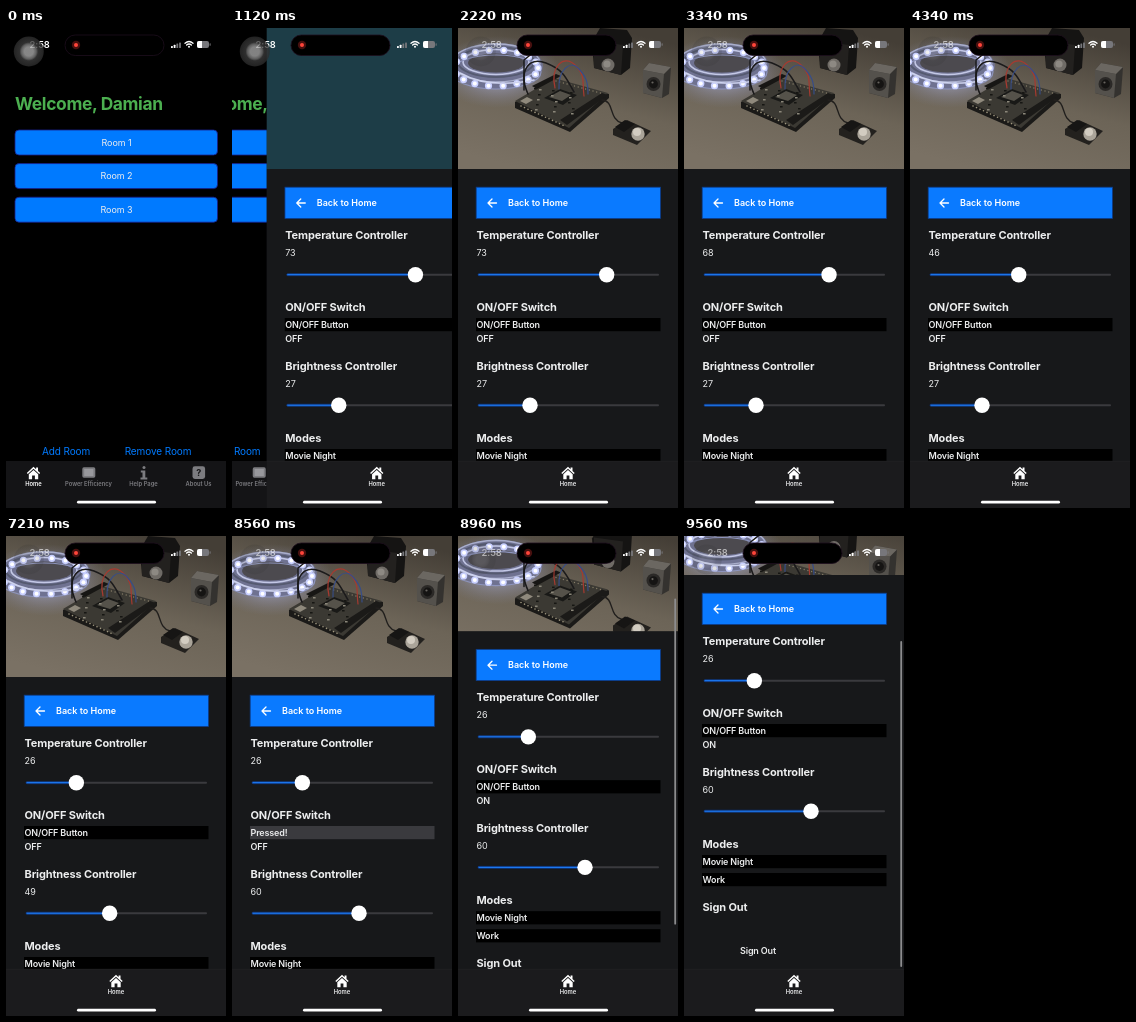
Recreate the animation shown at these times as an HTML page. Size 220x480 px, loop 9.63 s.

```html
<!DOCTYPE html>
<html lang="en">
<head>
<meta charset="utf-8">
<title>Room control</title>
<style>
html, body { margin: 0; width: 100%; height: 100%; overflow: hidden; background: #000; }
svg { display: block; width: 220px; height: 480px; }
text { font-family: Inter, "Liberation Sans", sans-serif; font-size: 9px; letter-spacing: -.01em; fill: #ecedee; }
.title { font-size: 17.4px; font-weight: 700; letter-spacing: -.02em; fill: #4caf50; }
.head { font-size: 11px; font-weight: 700; letter-spacing: -.012em; }
.semi { font-weight: 600; letter-spacing: 0; fill: #fff; }
.med { font-weight: 600; letter-spacing: -.018em; }
.mid { text-anchor: middle; }
.link { font-size: 10px; fill: #007aff; }
.tab { font-size: 5.8px; letter-spacing: 0; font-weight: 600; }
.line { fill: none; stroke-linecap: round; stroke-linejoin: round; }
</style>
</head>
<body>
<svg viewBox="0 0 220 480">
  <defs>
    <linearGradient id="table" x1=".3" y1="1" x2=".7" y2="0">
      <stop offset="0" stop-color="#7a7164"/><stop offset=".5" stop-color="#6c6457"/><stop offset="1" stop-color="#443e36"/>
    </linearGradient>
    <radialGradient id="glow">
      <stop offset="0" stop-color="#dfe4ff"/><stop offset=".55" stop-color="#a3a9d6" stop-opacity=".6"/><stop offset="1" stop-color="#8389a8" stop-opacity="0"/>
    </radialGradient>
    <radialGradient id="touch">
      <stop offset=".3" stop-color="#a8a8a8"/><stop offset=".5" stop-color="#777"/><stop offset=".62" stop-color="#3c3c3c"/><stop offset="1" stop-color="#2c2c2c"/>
    </radialGradient>
    <clipPath id="stage"><path d="M0 0H220V480H0Z"/></clipPath>
    <symbol id="house" viewBox="0 0 14 14" width="14" height="14">
      <path d="M7 .8 .3 7l1 1L7 2.8 12.7 8l1-1L11.5 5V1.5H9.6V3.2Z" fill="#fff"/>
      <path d="M2.3 8.3 7 4l4.7 4.3V13.3H8.4V9.4H5.6v3.9H2.3Z" fill="#fff"/>
    </symbol>
  </defs>
  <g clip-path="url(#stage)">
    <g id="home"></g>
    <g id="room">
      <rect width="220" height="480" fill="#17181a"/>
      <rect width="220" height="141" fill="#1d3d47"/>
      <g id="photo"></g>
      <g id="body"></g>
      <rect id="bar" x="216.3" y="28" width="1.8" height="326" rx=".9" fill="#8c8c8e"/>
      <rect y="433" width="220" height="47" fill="#1b1b1d"/>
      <path d="M0 433.2H220" stroke="#242427" stroke-width=".5"/>
      <use href="#house" x="103" y="438"/>
      <text class="tab mid" x="110" y="458" fill="#fff">Home</text>
    </g>
    <g id="status"></g>
  </g>
</svg>
<script>
const LOOP = 9630;
const $ = id => document.getElementById(id);
const text = (x, y, cls, s, id = '') => `<text ${id && `id="${id}"`} class="${cls}" x="${x}" y="${y}">${s}</text>`;
const rect = (x, y, w, h, fill, more = '') => `<rect x="${x}" y="${y}" width="${w}" height="${h}" fill="${fill}" ${more}/>`;
const path = (d, fill) => `<path d="${d}" fill="${fill}"/>`;
const line = (d, color, w) => `<path class="line" d="${d}" stroke="${color}" stroke-width="${w}"/>`;
const dot = (x, y, r, fill) => `<circle cx="${x}" cy="${y}" r="${r}" fill="${fill}"/>`;
const ring = (x, y, rx, ry, color, w) => `<ellipse cx="${x}" cy="${y}" rx="${rx}" ry="${ry}" fill="none" stroke="${color}" stroke-width="${w}"/>`;

function homeScreen() {
  const rooms = [1, 2, 3].map((n, i) => {
    const y = 102 + i * 33.6;
    return rect(9, y, 202.5, 25, '#007aff', 'rx="4" stroke="#1a1f8c" stroke-width=".8"') +
      text(110.5, y + 15.8, 'mid', 'Room ' + n);
  }).join('');
  const tabs = ['Home', 'Power Efficiency', 'Help Page', 'About Us'].map((s, i) =>
    `<text class="tab mid" x="${27.5 + i * 55}" y="458" style="fill:${i ? '#7c7c80' : '#fff'}">${s}</text>`).join('');
  const gray = '#7c7c80';
  return rect(0, 0, 220, 480, '#000') + text(9, 82, 'title', 'Welcome, Damian') + rooms +
    text(60, 427, 'link mid', 'Add Room') + text(152, 427, 'link mid', 'Remove Room') +
    rect(0, 433, 220, 47, '#141416') + tabs +
    '<use href="#house" x="20.5" y="438"/>' +
    rect(76.3, 439.3, 13, 10.4, gray, 'rx="1.6"') + rect(78.2, 441, 9.2, 7, '#98989c') +
    dot(138, 439.5, 1.5, gray) + path('M134.8 442.6h4.5v7h2v1.8h-6.8v-1.8h2v-5.2h-1.7Z', gray) +
    rect(186.5, 438.3, 12.6, 12.6, gray, 'rx="2.4"') +
    '<text class="mid" x="192.8" y="448.2" style="font-weight:700;fill:#141416">?</text>';
}

function photo() {
  let s = rect(0, 0, 220, 141, 'url(#table)') +
    '<ellipse cx="40" cy="44" rx="62" ry="36" fill="url(#glow)" opacity=".6"/>';
  // Coiled light strip
  s += '<ellipse cx="38" cy="38" rx="47" ry="23" fill="#6f7291"/>' +
    ring(38, 35, 44, 19, '#a9aecb', 1.4) + ring(38, 34, 38, 15, '#555a70', 2) +
    ring(38, 34, 33, 12.5, '#c3c8e6', 1.6) + '<ellipse cx="38" cy="35" rx="28" ry="9.5" fill="#4c4a4f"/>' +
    ring(38, 44, 45, 17, '#8d94bd', 1.2);
  for (let i = 0; i < 18; i++) {
    const a = i * .35;
    const x = 38 + 42 * Math.cos(a), y = 40 + 18 * Math.sin(a);
    s += dot(x, y, 3.6, '#c9d0ff') + dot(x, y, 2, '#fff');
  }
  s += line('M2 45Q30 61 76 52', '#cdd2ee', 1.6);
  // Circuit board
  s += path('M57 74 96 52 151 66 151 70 112 104 57 80Z', '#1b1a18') +
    path('M57 73 96 50 150 65 111 100Z', '#3b3933') +
    path('M74 58 98 46 103 48 79 61Z', '#171614') + path('M102 92 144 65 150 67 109 97Z', '#1b1a18') +
    path('M86 70 102 61 119 67 105 77Z', '#191917') + path('M91 69 102 63 113 67 104 73Z', '#55524a') +
    path('M62 73 69 69 75 72 68 76Z', '#8f897c');
  for (let i = 0; i < 13; i++) {
    s += dot(63 + i * 3.5, 78 + i * 1.6, .8, '#a09880') + dot(98 + i * 3.7, 53 + i, .7, '#857c67');
  }
  for (let i = 0; i < 16; i++) s += rect(76 + (i * 17) % 50, 60 + (i * 7) % 26, 2.6, 1.5, i % 2 ? '#8b877a' : '#161613');
  // Wires
  s += line('M70 66C60 44 70 28 88 35S108 50 116 64', '#1b1a1b', 1.6) +
    line('M97 60C92 38 106 26 117 37S124 54 126 68', '#a53a30', 1.2) +
    line('M101 61C100 42 112 32 120 40S130 54 130 66', '#374d87', 1.2) +
    line('M66 62V32L76 24', '#191818', 1.5) +
    line('M144 72C157 73 150 91 164 95', '#211f1d', 1.4);
  // Sensors
  s += path('M134 14 142 0 169 2 174 10 172 40 163 47 136 40Z', '#151413') +
    path('M136 13 165 17 163 47 136 40Z', '#23211f') + dot(150, 37, 6.5, '#6f6b66') + dot(149, 36, 3.6, '#8d8983') +
    path('M155 101 169 92 193 103 179 117 155 107Z', '#23211e') + path('M157 99 167 92 177 96 166 104Z', '#161514') +
    dot(180, 106, 6.7, '#aaa499') + dot(179, 104, 4, '#d2ccc1') +
    path('M185 42 191 35 213 39 211 66 204 70 185 65Z', '#34322f') + path('M185 42 206 46 204 70 185 65Z', '#54514c') +
    path('M185 42 191 35 213 39 206 46Z', '#6b6761') + dot(195.5, 56, 7, '#2b2927') + dot(195.5, 56, 4.4, '#151413') + dot(194.5, 54.5, 1.1, '#66635e');
  return s;
}

const slider = (y, id) => rect(20, y - 1, 181, 2, '#3a3a3e', 'rx="1"') +
  rect(20, y - 1, 50, 2, '#1f80ff', `rx="1" stroke="#0b2f74" stroke-width=".8" id="${id}Fill"`) +
  `<circle id="${id}Knob" cy="${y}" r="7.7" fill="#fff"/>`;

function roomBody() {
  return rect(0, 141, 220, 440, '#17181a') +
    rect(18.2, 159.2, 184.2, 31.2, '#0a7aff', 'stroke="#0c3c8c" stroke-width=".8"') +
    line('M38.5 175H30M34 171l-4 4 4 4', '#fff', 1.3) + text(50, 178.3, 'semi', 'Back to Home') +
    text(18.5, 211, 'head', 'Temperature Controller') + text(18.5, 228, '', '', 'tempText') + slider(246.7, 'temp') +
    text(18.5, 283, 'head', 'ON/OFF Switch') + rect(18, 290, 184.5, 13.2, '#000', 'id="row"') +
    text(18.5, 300, 'med', '', 'rowText') + text(18.5, 314, 'med', '', 'state') +
    text(18.5, 341.6, 'head', 'Brightness Controller') + text(18.5, 359.3, '', '', 'lightText') + slider(377.2, 'light') +
    text(18.5, 413.6, 'head', 'Modes') +
    rect(18, 421, 184.5, 13.2, '#000') + text(18.5, 431, 'med', 'Movie Night') +
    rect(18, 439, 184.5, 13.2, '#000') + text(18.5, 449, 'med', 'Work') +
    text(18.5, 476.6, 'head', 'Sign Out') + text(56, 519.5, 'med', 'Sign Out');
}

function statusBar() {
  const bars = [0, 1, 2, 3].map(i => rect(165 + i * 2.7, 18 - i * 1.2, 1.8, 2 + i * 1.2, i < 2 ? '#fff' : '#77777b', 'rx=".5"')).join('');
  return rect(59, 7, 99, 20.5, '#000', 'rx="10.2" stroke="#1d0e1e" stroke-width=".8"') +
    dot(70, 17, 4.2, '#47100f') + dot(70, 17, 2, '#ff453a') +
    '<text x="23.5" y="20" style="font-size:9.4px;font-weight:600;fill:#fff" id="clock">2:58</text>' + bars +
    line('M179 15.2Q183 11.7 187 15.2M180.6 17Q183 14.9 185.4 17', '#fff', 1.3) + dot(183, 18.8, 1, '#fff') +
    rect(191, 13, 12, 7, '#77777b', 'rx="2"') + path('M193 13h3v7H193q-2 0-2-2v-3q0-2 2-2Z', '#fff') +
    rect(203.6, 15.2, 1, 2.6, '#77777b', 'rx=".5"') +
    '<circle id="assist" cx="22.8" cy="23.5" r="15" fill="url(#touch)"/>' +
    rect(71, 472.8, 79, 2.8, '#fff', 'rx="1.4"');
}

$('home').innerHTML = homeScreen();
$('photo').innerHTML = photo();
$('body').innerHTML = roomBody();
$('status').innerHTML = statusBar();

const TEMP = [[3100, 73], [4340, 46], [5300, 26]];
const LIGHT = [[6150, 27], [7750, 60]];
const PUSH = 940, LOADED = 1300, PRESS = 8450, RELEASE = 8700, SCROLL = 8860;
const KNOB_LAG = 140;

function at(keys, t) {
  if (t <= keys[0][0]) return keys[0][1];
  for (let i = 1; i < keys.length; i++) {
    const [t0, a] = keys[i - 1], [t1, b] = keys[i];
    if (t < t1) return a + (b - a) * (t - t0) / (t1 - t0);
  }
  return keys[keys.length - 1][1];
}

function setSlider(id, keys, t) {
  const x = 27 + at(keys, t - KNOB_LAG) * 1.667;
  $(id + 'Knob').setAttribute('cx', x);
  $(id + 'Fill').setAttribute('width', x - 20);
  $(id + 'Text').textContent = Math.round(at(keys, t));
}

const clamp = v => Math.min(1, Math.max(0, v));
const move = (id, x, y) => $(id).setAttribute('transform', `translate(${x} ${y})`);

function render(t) {
  const w = Math.max(0, t - PUSH) * .01826;
  const left = (1 + w) * Math.exp(-w); // critically damped spring
  move('room', 220 * left, 0);
  move('home', -66 * (1 - left), 0);
  $('photo').style.display = t >= LOADED ? '' : 'none';

  setSlider('temp', TEMP, t);
  setSlider('light', LIGHT, t);
  const pressed = t >= PRESS && t < RELEASE;
  $('row').setAttribute('fill', pressed ? '#3a3a3e' : '#000');
  $('rowText').textContent = pressed ? 'Pressed!' : 'ON/OFF Button';
  $('state').textContent = t < RELEASE ? 'OFF' : 'ON';

  const p = clamp((t - SCROLL) / 560);
  const y = 102 * (1 - (1 - p) ** 3);
  move('body', 0, -y);
  move('photo', 0, -y / 4);
  move('bar', 0, y * .755);
  $('bar').style.display = p > 0 ? '' : 'none';

  const fade = clamp((t - 1100) / 500);
  $('assist').style.opacity = .8 - .65 * fade;
  $('clock').style.opacity = 1 - .4 * fade;
}

function tick() {
  render(performance.now() % LOOP);
  requestAnimationFrame(tick);
}
tick();
</script>
</body>
</html>
```
